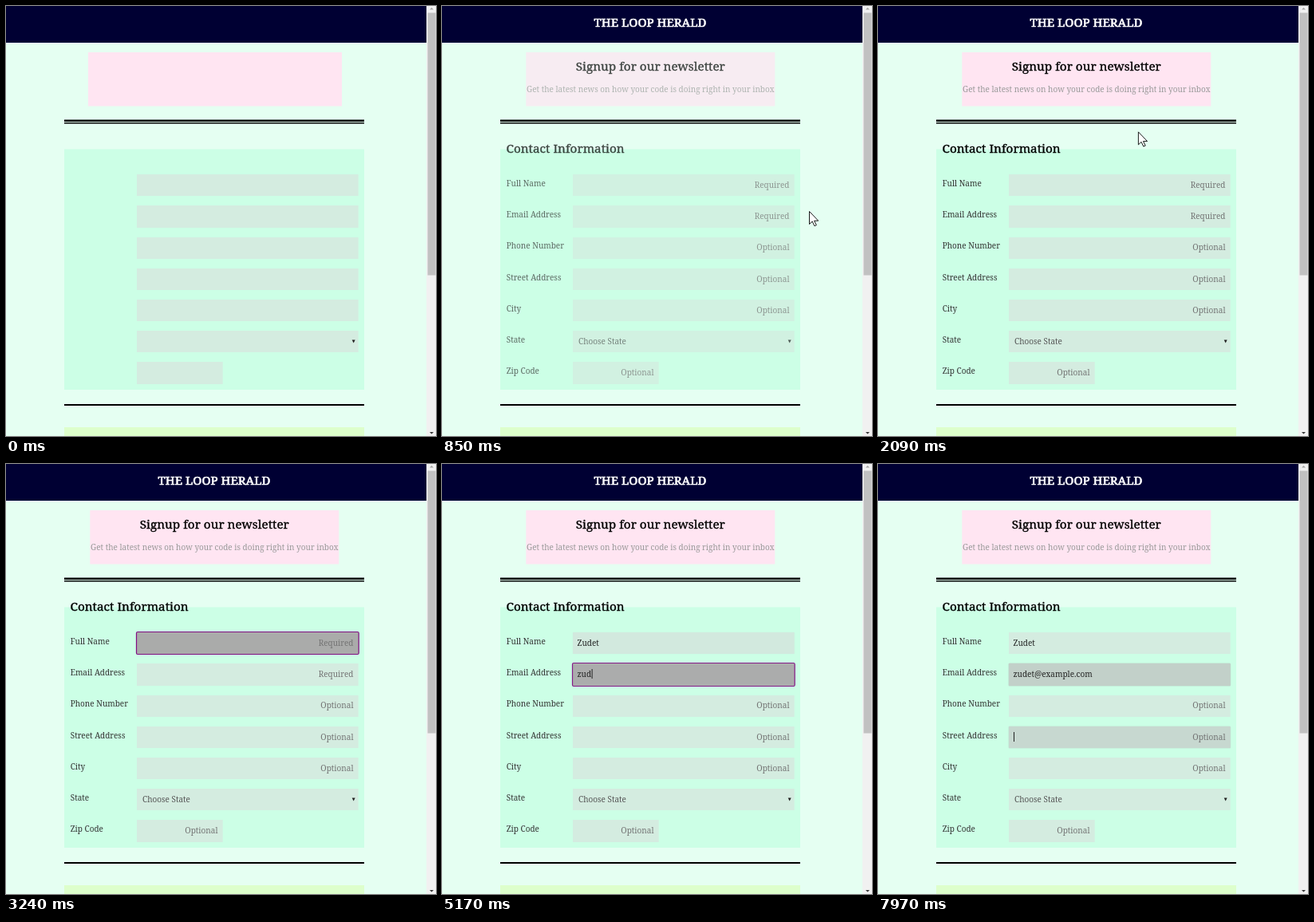
Animation, 539 px wide and 539 px high, one loop 8 s. Source, as an HTML page:

```html
<!DOCTYPE html>
<html lang="en">
<head>
<meta charset="utf-8">
<title>Newsletter signup</title>
<style>
  html, body { margin: 0; width: 100%; height: 100%; overflow: hidden; background: #e5fff2; }
  svg { display: block; width: 100vw; height: 100vh; }
  text { font: 10px "Noto Serif", serif; fill: #333; }
  .heading { font-size: 15.3px; fill: #000; stroke: #000; stroke-width: .35px; }
  .title { font-size: 15px; fill: #fff; stroke: #fff; stroke-width: .7px; }
  .middle { text-anchor: middle; }
  .hint { fill: #747474; text-anchor: end; }
  .typed { fill: #222; }
</style>
</head>
<body>
<svg viewBox="0 0 539 539">
  <rect width="539" height="539" fill="#e5fff2"/>
  <rect width="527" height="46" fill="#003"/>
  <g class="late"><text class="heading title middle" x="261" y="26">THE LOOP HERALD</text></g>

  <path d="M73 142.5h376v2.5h-376zM73 146h376v1.5h-376zM73 499h376v2h-376z"/>
  <rect x="73" y="179.5" width="376" height="301.5" fill="#ccffe6"/>
  <rect x="73" y="528" width="376" height="11" fill="#dfc"/>

  <g id="content">
    <rect id="banner" y="58" height="67.5" fill="#ffe5f2"/>
    <g id="fields"></g>
    <path d="M433.7 418.5h4l-2 4z" fill="#222"/>
    <g class="late" id="labels">
      <text class="heading middle" x="261.3" y="81">Signup for our newsletter</text>
      <text class="middle" x="261.3" y="108" style="fill:#999">Get the latest news on how your code is doing right in your inbox</text>
      <text class="heading" x="80.5" y="184">Contact Information</text>
      <text x="171" y="424" style="fill:#555">Choose State</text>
    </g>
  </g>
  <g id="input"></g>
  <rect id="caret" width="1" height="12" fill="#222"/>

  <rect x="527" width="12" height="539" fill="#f1f1f1"/>
  <rect x="528.5" y="8.5" width="10" height="329" fill="#c1c1c1"/>
  <path d="M531 4.5h5l-2.5-2.5z" fill="#a3a3a3"/>
  <path d="M531 534h5l-2.5 2.5z" fill="#333"/>
  <path id="cursor" d="M.5.5v16l3.7-3.5 2.7 5.7 2.4-1-2.7-5.5h5.1z" fill="#fff" stroke="#000" stroke-width=".9"/>
</svg>
<script>
const LOOP = 8000, LOADED = 80, FADE_START = 200, FADE = 1500;
const FOCUS = 1000, BLINK = 500, KEY_GAP = 170;
const FIELD_LEFT = 164, FIELD_TOP = 211.2, FIELD_HEIGHT = 27.1, PITCH = 39.2;

const ROWS = [
  ['Full Name', 'Required'], ['Email Address', 'Required'], ['Phone Number', 'Optional'],
  ['Street Address', 'Optional'], ['City', 'Optional'], ['State', ''], ['Zip Code', 'Optional']
];

const VISITS = [
  { row: 0, focus: 2440, blur: 4440, firstKey: 3550, text: 'Zudet' },
  { row: 1, focus: 4440, blur: 7630, firstKey: 4820, text: 'zudet@example.com' },
  { row: 3, focus: 7770, blur: LOOP, firstKey: LOOP, text: '' }
];

// The pointer rests at each end point until the next move begins.
const MOVES = [
  { start: 650, end: 850, to: [460, 257] },
  { start: 1310, end: 1690, to: [302, 161] },
  { start: 1930, end: 2240, to: [348, 154] },
  { start: 2400, end: 2620, to: [560, 118] }
];

const byId = id => document.getElementById(id);
const clamp = x => Math.min(1, Math.max(0, x));
const baseline = row => Math.round(228 + PITCH * row);

function add(parent, tag, attrs, text = '') {
  const node = document.createElementNS('http://www.w3.org/2000/svg', tag);
  for (const name in attrs) node.setAttribute(name, attrs[name]);
  node.textContent = text;
  return parent.appendChild(node);
}

// Field edges snap to whole pixels.
function fieldBox(row) {
  const top = FIELD_TOP + PITCH * row, y = Math.round(top);
  const width = ROWS[row][0] === 'Zip Code' ? 107.7 : 277.7;
  return { x: FIELD_LEFT, y, width, height: Math.round(top + FIELD_HEIGHT) - y };
}

ROWS.forEach(([label], row) => {
  add(byId('fields'), 'rect', { ...fieldBox(row), fill: '#d4ece0' });
  add(byId('labels'), 'text', { x: 80.7, y: baseline(row) - 2 }, label);
});

const visits = VISITS.map(visit => {
  const { x, y, width, height } = fieldBox(visit.row);
  const box = { x: x - .5, y: y - .5, width: width + 1, height: height + 1, rx: 1.5 };
  const input = byId('input');
  return {
    ...visit,
    fill: add(input, 'rect', { ...box, fill: '#a9a9a9' }),
    ring: add(input, 'rect', { ...box, fill: 'none', stroke: '#800080', 'stroke-width': 1.2 }),
    typed: add(input, 'text', { x: 169.5, y: baseline(visit.row), class: 'typed' })
  };
});

// Hints lie above the focus fill, so they form their own fading layer.
const hintLayer = add(byId('input'), 'g', { class: 'late' });
const hints = ROWS.map(([, hint], row) => {
  const { x, width } = fieldBox(row);
  return add(hintLayer, 'text', { x: x + width - 6.2, y: baseline(row), class: 'hint' }, hint);
});
const lateNodes = document.querySelectorAll('.late');

// The CSS "ease" curve: cubic-bezier(.25, .1, .25, 1)
function ease(x) {
  if (x <= 0) return 0;
  if (x >= 1) return 1;
  const bezier = (a, b, s) => 3 * a * s * (1 - s) ** 2 + 3 * b * s * s * (1 - s) + s ** 3;
  let low = 0, high = 1;
  for (let i = 0; i < 20; i++) {
    const mid = (low + high) / 2;
    if (bezier(.25, .25, mid) < x) low = mid; else high = mid;
  }
  return bezier(.1, 1, low);
}

function drawVisit({ row, focus, blur, firstKey, text, fill, ring, typed }, t) {
  const level = ease((t - focus) / FOCUS) * (1 - ease((t - blur) / FOCUS));
  const keys = Math.floor((t - firstKey) / KEY_GAP) + 1;
  const count = Math.min(text.length, Math.max(0, keys));
  fill.style.opacity = level;
  ring.style.opacity = clamp((level - .6) / .4);
  typed.textContent = text.slice(0, count);
  hints[row].style.display = count ? 'none' : '';

  if (t < focus || t >= blur) return;
  const lastKey = count ? firstKey + (count - 1) * KEY_GAP : focus;
  const caret = byId('caret');
  caret.setAttribute('x', 170 + (count ? typed.getComputedTextLength() : 0));
  caret.setAttribute('y', baseline(row) - 10);
  caret.style.display = (t - lastKey) % (2 * BLINK) < BLINK ? '' : 'none';
}

function pointerAt(t) {
  let place = [560, 300];
  for (const { start, end, to } of MOVES) {
    const p = clamp((t - start) / (end - start));
    place = place.map((v, i) => v + (to[i] - v) * p);
  }
  return place;
}

function draw(t) {
  const loaded = t >= LOADED;
  const opacity = loaded ? ease((t - FADE_START) / FADE) : 1;
  lateNodes.forEach(node => node.style.display = loaded ? '' : 'none');
  byId('content').style.opacity = opacity;
  hintLayer.style.opacity = opacity;
  byId('banner').setAttribute('x', loaded ? 105.3 : 103);
  byId('banner').setAttribute('width', loaded ? 312 : 318);

  byId('caret').style.display = 'none';
  visits.forEach(visit => drawVisit(visit, t));
  byId('cursor').setAttribute('transform', `translate(${pointerAt(t)})`);
}

const origin = performance.now();
function tick() {
  draw((performance.now() - origin) % LOOP);
  requestAnimationFrame(tick);
}
tick();
</script>
</body>
</html>
```
